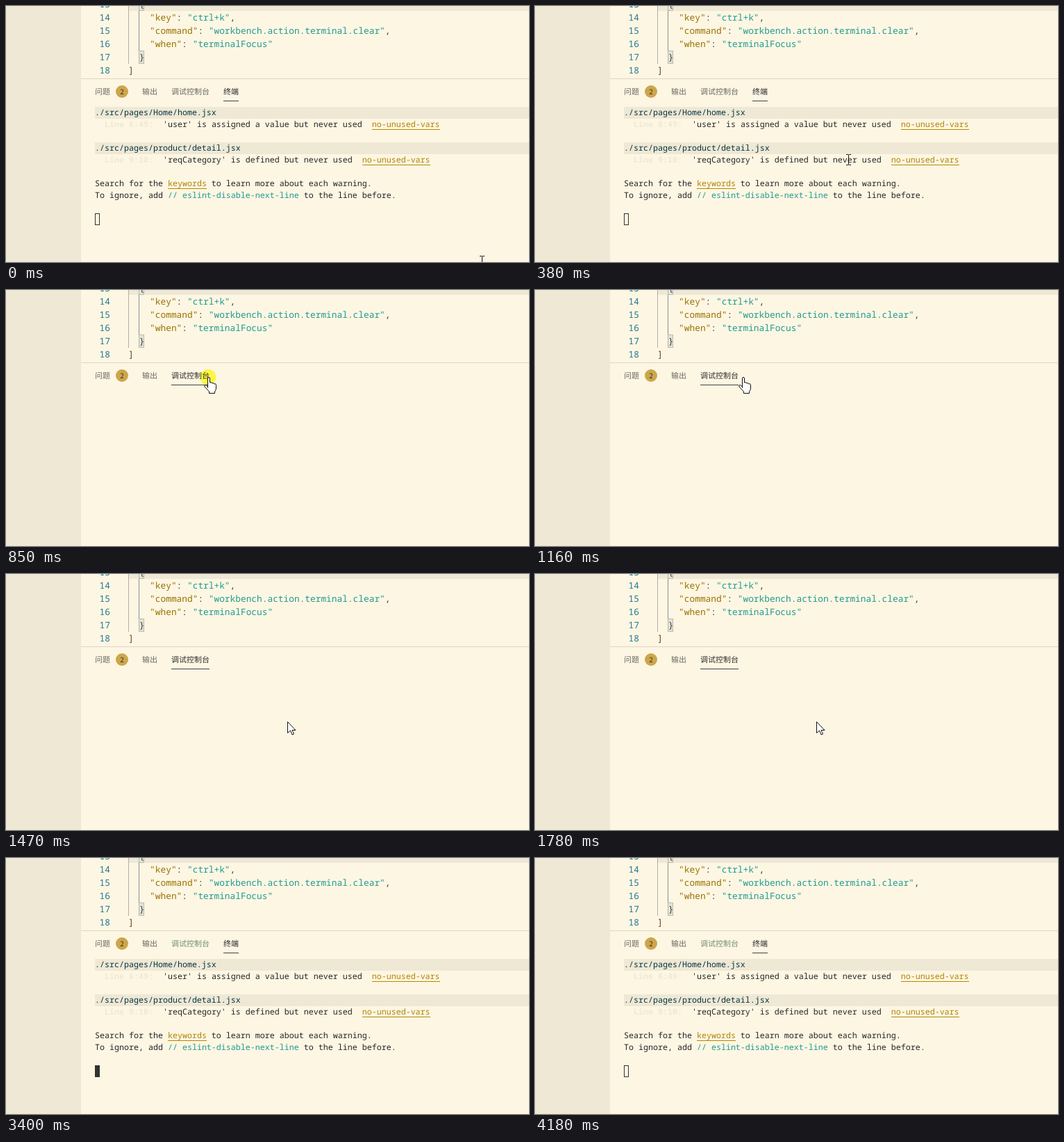
Animation of 753 by 368 pixels, one loop 4.26 s. Source, as an HTML page:

```html
<!DOCTYPE html>
<html lang="zh-CN">
<head>
<meta charset="utf-8">
<title>Terminal panel</title>
<style>
html, body { margin: 0; width: 100%; height: 100%; overflow: hidden; background: #fdf6e3; }
svg { display: block; }
text { white-space: pre; text-rendering: geometricPrecision; fill: #262626; }
.code, .term { font-family: "Noto Sans Mono", "DejaVu Sans Mono", monospace; font-weight: 500; }
.code { font-size: 12.83px; }
.term { font-size: 11.667px; }
.tabs text { font: 11px "Noto Sans CJK SC", "Noto Sans CJK", "Noto Sans", sans-serif; fill: #6c6962; }
.tabs .badge { font-size: 10px; fill: #333; }
.code .num { fill: #237893; }
.code .key { fill: #977200; }
.code .str, .cyan { fill: #219a90; }
.code .pun { fill: #3c4448; }
.path { fill: #073642; }
.line { fill: #eee8d5; font-weight: bold; }
.rule { fill: #b08400; }
#press { mix-blend-mode: multiply; }
</style>
</head>
<body>
<svg width="753" height="368" viewBox="0 0 753 368">
  <rect width="108" height="368" fill="#eee8d5"/>

  <g class="code">
    <rect x="176" width="577" height="7" fill="#eee8d5"/>
    <path d="M176.5 0V83" stroke="#b3adab"/>
    <path d="M191.5 7V65" stroke="#938b96"/>
    <g fill="#e4e4d2" stroke="#b9b9b4">
      <rect x="191.5" y="-12.5" width="7" height="19"/>
      <rect x="191.5" y="64.5" width="7" height="18"/>
    </g>
    <g id="nums"></g>
    <text class="pun" x="191.7" y="2">{</text>
    <text class="pun" x="207.1" y="21"><tspan class="key">"key"</tspan>: <tspan class="str">"ctrl+k"</tspan>,</text>
    <text class="pun" x="207.1" y="40"><tspan class="key">"command"</tspan>: <tspan class="str">"workbench.action.terminal.clear"</tspan>,</text>
    <text class="pun" x="207.1" y="59"><tspan class="key">"when"</tspan>: <tspan class="str">"terminalFocus"</tspan></text>
    <text class="pun" x="191.7" y="78">}</text>
    <text x="176.3" y="97" style="fill:#6b4526">]</text>
  </g>

  <path d="M108 104.5H753" stroke="#ddd6c1"/>
  <g class="tabs">
    <text x="128" y="127">问题</text>
    <circle cx="167" cy="123" r="9" fill="#cda64a"/>
    <text class="badge" x="167" y="126.6" text-anchor="middle">2</text>
    <text x="196" y="127">输出</text>
    <text id="debugTab" x="238" y="127">调试控制台</text>
    <text id="termTab" x="313" y="127" style="fill:#262626">终端</text>
    <path id="underline" stroke="#424242"/>
  </g>

  <g id="term" class="term">
    <path d="M128 145H753V162H128zM128 196H753V213H128z" fill="#eee8d5"/>
    <text class="path" x="128" y="157">./src/pages/Home/home.jsx</text>
    <text x="142" y="174"><tspan class="line">Line 6:49:</tspan>  'user' is assigned a value but never used  <tspan class="rule">no-unused-vars</tspan></text>
    <text class="path" x="128" y="208">./src/pages/product/detail.jsx</text>
    <text x="142" y="225"><tspan class="line">Line 9:10:</tspan>  'reqCategory' is defined but never used  <tspan class="rule">no-unused-vars</tspan></text>
    <text x="128" y="259">Search for the <tspan class="rule">keywords</tspan> to learn more about each warning.</text>
    <text x="128" y="276">To ignore, add <tspan class="cyan">// eslint-disable-next-line</tspan> to the line before.</text>
    <path d="M527 177.5H625M513 228.5H611M233 262.5H289" stroke="#b58900"/>
    <rect id="caret" x="128.5" y="298.5" width="6" height="16" stroke="#333"/>
  </g>

  <g id="pointer">
    <circle id="press" cx="-1" cy=".5" r="11.5" fill="#ffff50"/>
    <path id="shape" stroke="#111" stroke-linejoin="round"/>
  </g>
</svg>
<script>
const LOOP = 4260;
const $ = id => document.getElementById(id);
const show = (id, on) => $(id).setAttribute('visibility', on ? 'visible' : 'hidden');

const shapes = {
  hand: 'M-1.5 15.5V2Q-1.5.5 0 .5T1.5 2V8Q4.5 7 4.5 9 7.5 8 7.5 10 10.5 9 10.5 11.5V16Q10.5 19 8.5 21V23.5H.5V21L-6 14Q-7 12-5 11.5-3.5 11.5-1.5 14.5z',
  arrow: 'M.5.5V16.5L4.5 13 7 19 9.5 18 7 12.5H12z',
  beam: 'M-1-6.5H1.5Q2.5-6.5 2.5-5.5V7.5Q2.5 8.5 1.5 8.5H-1M6-6.5H3.5Q2.5-6.5 2.5-5.5M2.5 7.5Q2.5 8.5 3.5 8.5H6'
};

// Pointer moves: first step, last step, number of steps, end point
const start = [683, 366];
const moves = [
  [70, 540, 7, 297, 125],
  [610, 610, 1, 292, 125],
  [1160, 1160, 1, 300, 125],
  [1240, 1470, 4, 405, 212],
  [2850, 2950, 2, 321, 131],
  [3250, 3330, 2, 526, 350]
];
const ease = p => p * p * (3 - 2 * p);

function pointerAt(t) {
  let [x, y] = start;
  for (const [from, to, steps, endX, endY] of moves) {
    if (t < from) break;
    const done = t >= to ? steps : 1 + Math.floor((t - from) / (to - from) * (steps - 1));
    const p = ease(done / steps);
    x += (endX - x) * p;
    y += (endY - y) * p;
  }
  return [Math.round(x), Math.round(y)];
}

for (let n = 13; n <= 18; n++)
  $('nums').innerHTML += `<text class="num" x="134.6" y="${2 + (n - 13) * 19}">${n}</text>`;

function draw(t) {
  const [x, y] = pointerAt(t);
  const inTabs = y < 139;
  const terminal = t < 850 || t >= 2620;
  const shape = inTabs ? 'hand' : terminal ? 'beam' : 'arrow';
  const hover = inTabs && x < 305;

  show('term', terminal);
  show('termTab', terminal);
  $('underline').setAttribute('d', terminal ? 'M313 136.5H335' : 'M238 136.5H293');
  $('debugTab').style.fill = !terminal || hover ? '#302f2c' : t >= 2620 ? '#72906f' : '#6c6962';
  $('caret').setAttribute('fill', t >= 2620 && t < 4180 ? '#333' : 'none');

  const visible = t < 3400;
  show('pointer', visible);
  show('press', visible && (t >= 780 && t < 930 || t >= 1700 && t < 1780));
  $('pointer').setAttribute('transform', `translate(${x} ${y})`);
  $('shape').setAttribute('d', shapes[shape]);
  $('shape').setAttribute('fill', shape === 'beam' ? 'none' : '#fff');
}

const begin = performance.now();
function frame() {
  draw((performance.now() - begin) % LOOP);
  requestAnimationFrame(frame);
}
frame();
</script>
</body>
</html>
```
